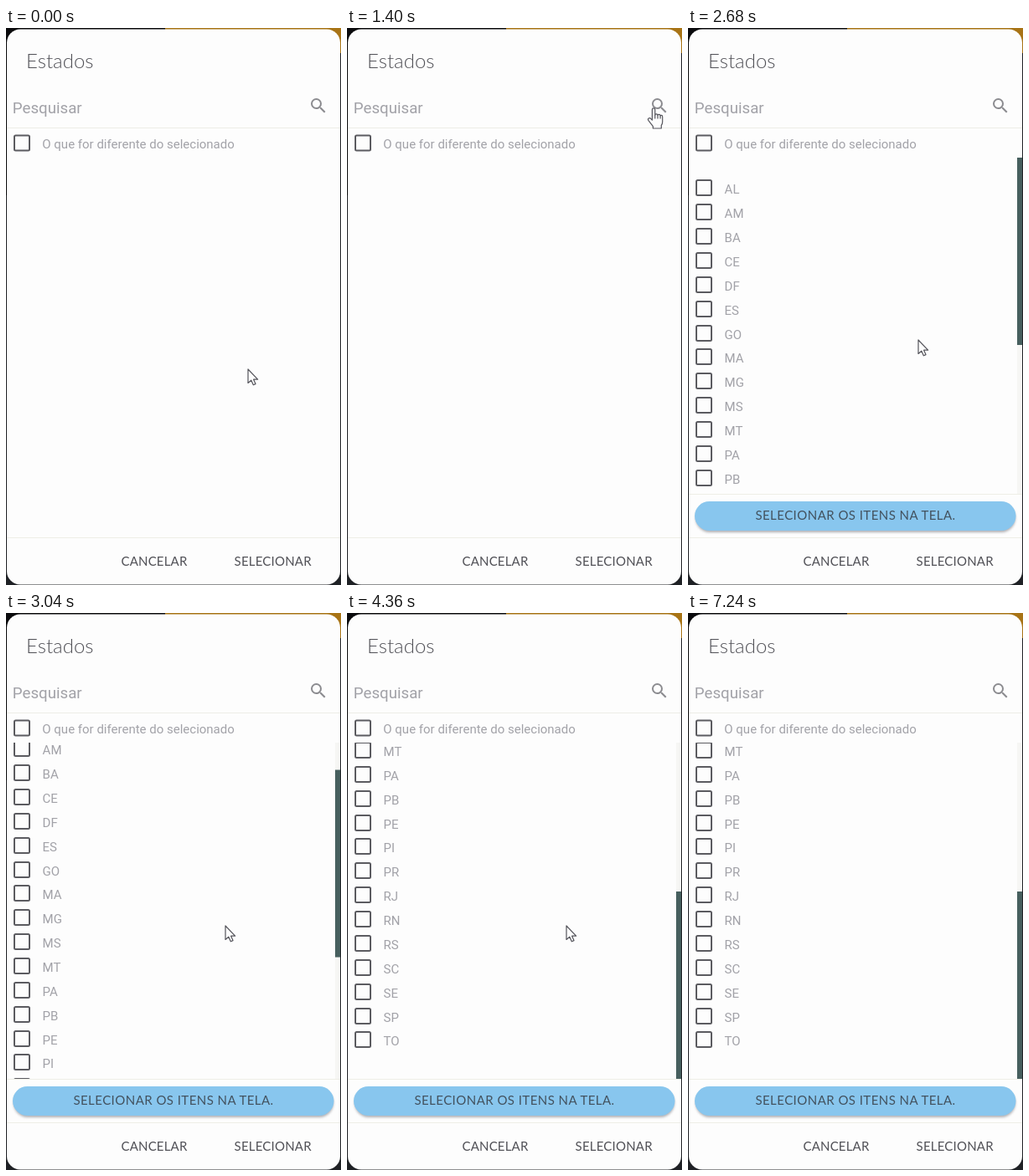
An HTML page that plays this animation: 400 px wide and 666 px high, repeating every 7.96 s.

```html
<!DOCTYPE html>
<html lang="pt">
<head>
<meta charset="utf-8">
<title>Estados</title>
<style>
  html, body { margin: 0; width: 100%; height: 100%; overflow: hidden; background: #1f2125; }
  svg { display: block; width: 100vw; height: 100vh; }
  text { font-family: Roboto, sans-serif; font-size: 15px; fill: #a2a2a8; }
  .geo { font-family: Lato, sans-serif; fill: #515157; }
  .mid { text-anchor: middle; letter-spacing: .2px; }
  .box { fill: none; stroke: #5b5b60; stroke-width: 2; }
  .rule { stroke: #eeeee6; stroke-width: 1; }
  .cursor { fill: #fdfdfd; stroke: #55555c; stroke-width: 1.2; stroke-linejoin: round; }
</style>
</head>
<body>
<svg viewBox="0 0 400 666" preserveAspectRatio="none">
  <defs>
    <clipPath id="view"><rect x="1" y="155" width="398" height="402"/></clipPath>
    <filter id="soft" x="-5%" y="-30%" width="110%" height="170%"><feGaussianBlur stdDeviation="1.6"/></filter>
  </defs>

  <rect width="400" height="666" fill="#1f2125"/>
  <rect width="190" height="200" fill="#0b0b0d"/>
  <rect x="190" width="210" height="30" fill="#a87416"/>
  <rect x="1" y="1.5" width="398" height="664" rx="16" fill="#fdfdfd"/>

  <text class="geo" x="24" y="48" style="font-size:24px;font-weight:300">Estados</text>
  <text x="7.8" y="101.5" style="font-size:18.7px">Pesquisar</text>
  <path id="lens" transform="translate(361 81)" fill="#8c8c90" d="M15.5 14h-.79l-.28-.27A6.47 6.47 0 0 0 16 9.5 6.5 6.5 0 1 0 9.5 16c1.61 0 3.09-.59 4.23-1.57l.27.28v.79l5 4.99L20.49 19l-4.99-5zm-6 0a4.5 4.5 0 1 1 0-9 4.5 4.5 0 0 1 0 9z"/>
  <g id="loader" transform="translate(368 94)">
    <circle id="halo" r="22.5" fill="#fdfdfa" stroke="#f4d68f" stroke-width="1.8"/>
    <circle id="disc" r="18" fill="#ebe8e6"/>
    <circle id="ring" r="13.5" fill="#e6e3ea" stroke="#f2c480" stroke-width="4.2"/>
    <circle r="4.2" fill="#eeae5c"/>
  </g>
  <path class="rule" d="M1 119.5H399"/>
  <rect class="box" x="10" y="128.5" width="18" height="18" rx="1.5"/>
  <text x="43.3" y="144">O que for diferente do selecionado</text>

  <g id="results">
    <g clip-path="url(#view)">
      <g id="list"></g>
      <rect x="393" y="155" width="6" height="402" fill="#f6f6f4"/>
      <rect id="thumb" x="393" y="155" width="6" height="224" fill="#47605f"/>
    </g>
    <path class="rule" d="M1 557.5H399"/>
    <rect x="9" y="569" width="382" height="34" rx="17" fill="#8f8f94" opacity=".7" filter="url(#soft)"/>
    <rect x="8" y="566" width="383.5" height="35" rx="17.5" fill="#88c6ee"/>
    <text class="geo mid" x="200" y="588.4" style="letter-spacing:.45px;fill:#43525f">SELECIONAR OS ITENS NA TELA.</text>
  </g>

  <path class="rule" d="M1 609.5H399"/>
  <g id="pills" fill="#f1f1ef">
    <rect x="108" y="620" width="138" height="36" rx="18"/>
    <rect x="246" y="620" width="147" height="36" rx="18"/>
  </g>
  <g id="actions">
    <text class="geo mid" x="177" y="643.3">CANCELAR</text>
    <text class="geo mid" x="318.7" y="643.3">SELECIONAR</text>
  </g>

  <path id="arrow" class="cursor" d="M0 0V16.5L3.8 13.2L6.3 18.8L9 17.6L6.6 12.2H11.6Z"/>
  <g id="hand" class="cursor">
    <path d="M-1.6 14V1.5a1.7 1.7 0 0 1 3.4 0V8q0-1.2 1.6-1.2T5 8.4q.2-1 1.6-1T8.1 9q.3-.7 1.4-.6t1.2 1.6v6.2q0 2.2-1.4 4.2V24H-.6V21.6L-6 14.6q-1.2-1.8.2-2.7t2.8.7Z"/>
    <path d="M1.8 8v4.5M5 8.5v4M8.1 9v3.5" fill="none"/>
  </g>
</svg>
<script>
const LOOP = 7960, STEP = 40;
const LOAD = 1480, READY = 2400;
const MAX_SCROLL = 316, TRACK = 402, THUMB = 224;
const ROW = 28.87, FIRST = 192.3;
const $ = id => document.getElementById(id);
const states = "AL AM BA CE DF ES GO MA MG MS MT PA PB PE PI PR RJ RN RS SC SE SP TO".split(" ");

$("list").innerHTML = states.map((name, i) => {
  const y = Math.round(FIRST + i * ROW);
  return `<rect class="box" x="10" y="${y - 10}" width="18" height="18" rx="1.5"/>` +
    `<text x="43.6" y="${y + 6}">${name}</text>`;
}).join("");

const part = (t, a, b) => Math.min(1, Math.max(0, (t - a) / (b - a)));
const easeOut = (p, k) => 1 - (1 - p) ** k;
const smooth = p => p * p * (3 - 2 * p);
const show = (id, on) => $(id).setAttribute("display", on ? "inline" : "none");
const place = (id, x, y) => $(id).setAttribute("transform", `translate(${x} ${y})`);

// Each move: start, end, x shift, y shift, easing
const moves = [
  [0, 1200, 77, -312, p => easeOut(p, 1.5)],
  [1520, 2000, -79, 291, smooth],
  [2080, 2640, -12, -14, smooth],
  [2780, 2960, -13, 1, smooth],
  [5040, 5200, 98, 320, p => p]
];
const wheel = [
  [2970, 3220, 120],
  [3280, 3520, 116],
  [3765, 4360, MAX_SCROLL - 236]
];

function draw(t) {
  const loading = t >= LOAD && t < READY;
  let x = 289, y = 408, scroll = 0;
  for (const [a, b, dx, dy, ease] of moves) {
    const p = ease(part(t, a, b));
    x += dx * p;
    y += dy * p;
  }
  for (const [a, b, d] of wheel) scroll += d * easeOut(part(t, a, b), 2);

  const hand = !loading && Math.hypot(x - 368, y - 94) < 23;
  show("arrow", !hand);
  show("hand", hand);
  place(hand ? "hand" : "arrow", x, y);

  show("lens", !loading);
  show("loader", loading);
  show("pills", loading);
  $("actions").setAttribute("opacity", loading ? .2 : 1);
  const beat = Math.cos((t - 2000) / 800 * 2 * Math.PI);
  $("halo").setAttribute("r", 21.5 + beat);
  $("disc").setAttribute("r", 17.5 + beat / 2);
  $("ring").setAttribute("r", 12.5 + beat);

  show("results", t >= READY);
  place("list", 0, -Math.round(scroll));
  place("thumb", 0, scroll / MAX_SCROLL * (TRACK - THUMB));
}

let start;
function tick(now) {
  start ??= now;
  const t = (now - start) % LOOP;
  draw(t - t % STEP);
  requestAnimationFrame(tick);
}
draw(0);
requestAnimationFrame(tick);
</script>
</body>
</html>
```
